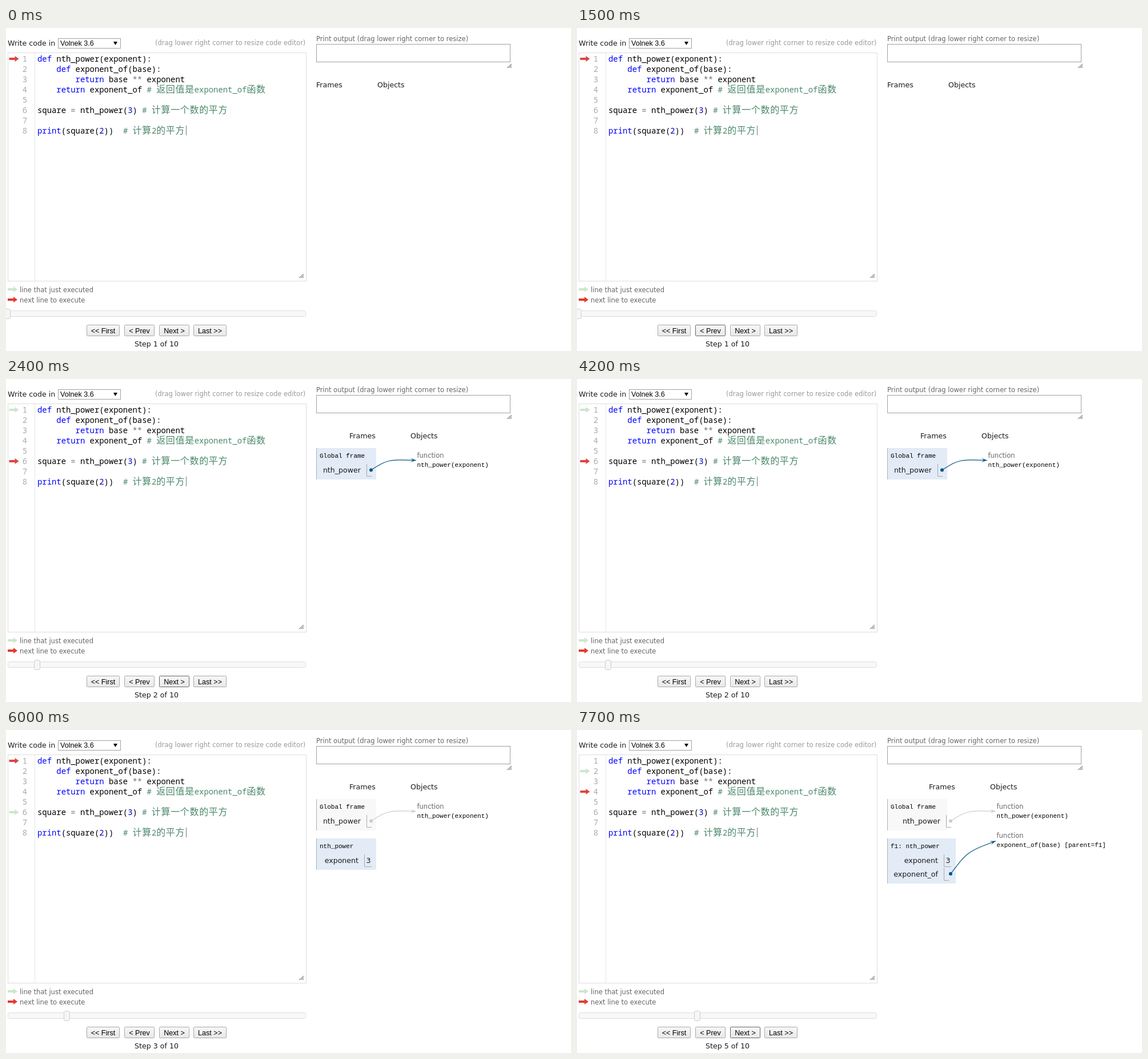
Recreate the animation shown at these times as an HTML page. Size 989x566 px, loop 8 s.

```html
<!DOCTYPE html>
<html lang="en">
<head>
<meta charset="utf-8">
<style>
html, body { margin: 0; width: 100%; height: 100%; overflow: hidden; background: #fff; }
svg { display: block; width: 989px; height: 566px; }
text { white-space: pre; font: 12.6px "DejaVu Sans", Verdana, sans-serif; fill: #1c1c1c; }
.small { font-size: 11.5px; fill: #666; }
.hint { fill: #999; }
.ui { font: 12.6px "Liberation Sans", Arial, sans-serif; fill: #000; }
.code { font: 13.88px "Noto Sans Mono", Consolas, monospace; fill: #000; }
.num { fill: #aaa; }
.mono { font: 11px "Liberation Mono", "Courier New", monospace; fill: #000; }
.kw { fill: #00f; }
.op { fill: #687687; }
.lit { fill: #0000cd; }
.note { fill: #4c886b; }
.cjk { font: 300 16px "Noto Sans CJK SC", "Noto Sans CJK", sans-serif; letter-spacing: .66px; }
</style>
</head>
<body>
<svg viewBox="0 0 989 566">
  <defs>
    <linearGradient id="face" x2="0" y2="1"><stop stop-color="#f7f7f7"/><stop offset="1" stop-color="#e8e8e8"/></linearGradient>
  </defs>
  <g id="base"></g>
  <g id="live"></g>
</svg>
<script>
const RED = '#dc4640', GREEN = '#cde6cd', BLUE = '#005583', GREY = '#ccc';
const base = document.getElementById('base'), live = document.getElementById('live');

const text = (x, y, s, cls = '', anchor = 'start') =>
  `<text x="${x}" y="${y}" class="${cls}" text-anchor="${anchor}">${s}</text>`;
const box = (x, y, w, h, fill, stroke = 'none', r = 0) =>
  `<rect x="${x}" y="${y}" width="${w}" height="${h}" rx="${r}" fill="${fill}" stroke="${stroke}"/>`;
const line = (d, stroke, width = 1) =>
  `<path d="${d}" fill="none" stroke="${stroke}" stroke-width="${width}"/>`;
const span = (cls, s) => `<tspan class="${cls}">${s}</tspan>`;
const kw = s => span('kw', s), op = s => span('op', s), lit = s => span('lit', s);
const note = s => span('note', s.replace(/[\u4e00-\u9fff]+/g, m => span('note cjk', m)));
const arrow = (x, y, color) =>
  `<path d="M${x} ${y - 2}h10v-3l7 5-7 5v-3h-10z" fill="${color}"/>`;
const grip = (x, y) => line(`M${x} ${y}l8-7M${x + 3} ${y}l5-4.5M${x + 6} ${y}l2-2`, '#555');

const code = [
  `${kw('def')} nth_power(exponent):`,
  `    ${kw('def')} exponent_of(base):`,
  `        ${kw('return')} base ${op('**')} exponent`,
  `    ${kw('return')} exponent_of ${note('# 返回值是exponent_of函数')}`,
  '',
  `square ${op('=')} nth_power(${lit(3)}) ${note('# 计算一个数的平方')}`,
  '',
  `${kw('print')}(square(${lit(2)}))  ${note('# 计算2的平方')}`
];
const rowY = n => 36 + 18 * n;

base.innerHTML =
  text(3, 31, 'Write code in') +
  box(91.5, 18.5, 109, 17, '#fff', '#a0a0a0') +
  text(95, 31, 'Volnek 3.6', 'ui') +
  '<path d="M188 24h7l-3.500 6z"/>' +
  text(261, 30, '(drag lower right corner to resize code editor)', 'small hint') +
  box(3.5, 43.5, 522, 400, '#fff', '#ddd') +
  line('M50.500 44V443', '#e2e8e4') +
  code.map((s, i) => text(37, rowY(i + 1) + 5, i + 1, 'code num', 'end') +
    text(55, rowY(i + 1) + 5, s, 'code')).join('') +
  line('M315.500 171V188', '#777') +
  grip(513, 438) +
  text(543, 23, 'Print output (drag lower right corner to resize)', 'small') +
  box(543.5, 28.5, 339, 31, '#fff', '#a0a0a0') +
  grip(877, 70) +
  arrow(3, 458, GREEN) + text(24, 463, 'line that just executed', 'small') +
  arrow(3, 476, '#e5392f') + text(24, 481, 'next line to execute', 'small') +
  box(3.5, 495.5, 521, 10, '#f8f8f8', '#ddd', 3);

const buttons = [[141, 58, '&lt;&lt; First'], [207, 53, '&lt; Prev'], [268, 53, 'Next &gt;'], [328, 58, 'Last &gt;&gt;']];

function drawButtons(hover) {
  return buttons.map(([x, w, label], i) =>
    box(x + .5, 520.5, w - 1, 19, 'url(#face)', i === hover ? '#666' : '#aaa', 1) +
    text(x + w / 2, 535, label, 'ui', 'middle')).join('');
}

function frame(y, w, h, title, active) {
  return box(543, y, w, h, active ? '#e2ebf6' : '#f8f8f8') +
    line(`M543.500 ${y}v${h}`, '#a6b3b6') + text(549, y + 17, title, 'mono');
}

function variable(name, x, y, value = '') {
  return text(x - 10, y, name, '', 'end') +
    line(`M${x + .5} ${y - 15}v21.500H${value ? x + 13 : x + 9}`, '#aaa') +
    text(x + 3.5, y, value);
}

// Bowed connector: both control points sit 10px up and left of the midpoint
function pointer(x, y, tx, ty, color) {
  const cx = (x + tx) / 2 - 10, cy = (y + ty) / 2 - 10;
  const angle = Math.atan2(ty - cy, tx - cx) * 180 / Math.PI;
  return `<circle cx="${x}" cy="${y}" r="3" fill="${color}"/>` +
    line(`M${x} ${y}C${cx} ${cy} ${cx} ${cy} ${tx} ${ty}`, color, 1.2) +
    `<path d="M0 0l-10-3.500 4.500 3.500-4.500 3.500z" fill="${color}" transform="translate(${tx} ${ty}) rotate(${angle})"/>`;
}

const func = (x, y, name) => text(x, y, 'function', 'small') + text(x, y + 16, name, 'mono');

function drawHeap(step) {
  const dx = step === 1 ? -58 : step === 5 ? 15 : 0;
  let out = text(601 + dx, 104, 'Frames') + text(708 + dx, 104, 'Objects');
  if (step === 1) return out;
  out += frame(121, 105, 55, 'Global frame', step === 2) +
    variable('nth_power', 631 + dx, 164) +
    pointer(639 + dx, 159.5, 718 + dx, 142.5, step === 2 ? BLUE : GREY) +
    func(719.5 + dx, 138, 'nth_power(exponent)');
  if (step === 3 || step === 4)
    out += frame(190, 105, 55, 'nth_power', true) + variable('exponent', 627, 233, '3');
  if (step === 5)
    out += frame(190, 120, 79, 'f1: nth_power', true) +
      variable('exponent', 642, 233, '3') + variable('exponent_of', 642, 257) +
      pointer(654, 252, 733, 194.5, BLUE) +
      func(734.5, 189, 'exponent_of(base) [parent=f1]');
  return out;
}

// [just executed, next] line per step
const marks = [[0, 1], [1, 6], [6, 1], [1, 2], [2, 4]];
const stepTimes = [2400, 4300, 6200, 7700];
// A button's outline is dark while hovered and light again while pressed
const hovers = [[1000, 1100, 0], [1500, 1600, 1], [1700, 2300, 2], [2400, 4200, 2], [4300, 6000, 2], [6200, 7500, 2], [7700, 8000, 2]];

function draw(step, hover) {
  const [done, next] = marks[step - 1];
  live.innerHTML =
    (done ? arrow(5.5, rowY(done), GREEN) : '') + arrow(5.5, rowY(next), RED) +
    box(52 * step - 54.5, 492.5, 10, 17, '#f6f6f6', '#ccc', 3) +
    drawButtons(hover) +
    text(263.5, 558, `Step ${step} of 10`, '', 'middle') +
    drawHeap(step);
}

let start, last;

function tick(now) {
  start ??= now;
  const t = (now - start) % 8000;
  const step = 1 + stepTimes.filter(s => t >= s).length;
  const hover = hovers.find(([a, b]) => t >= a && t < b)?.[2];
  const key = `${step},${hover}`;
  if (key !== last) draw(step, hover);
  last = key;
  requestAnimationFrame(tick);
}
draw(1);
requestAnimationFrame(tick);
</script>
</body>
</html>
```
